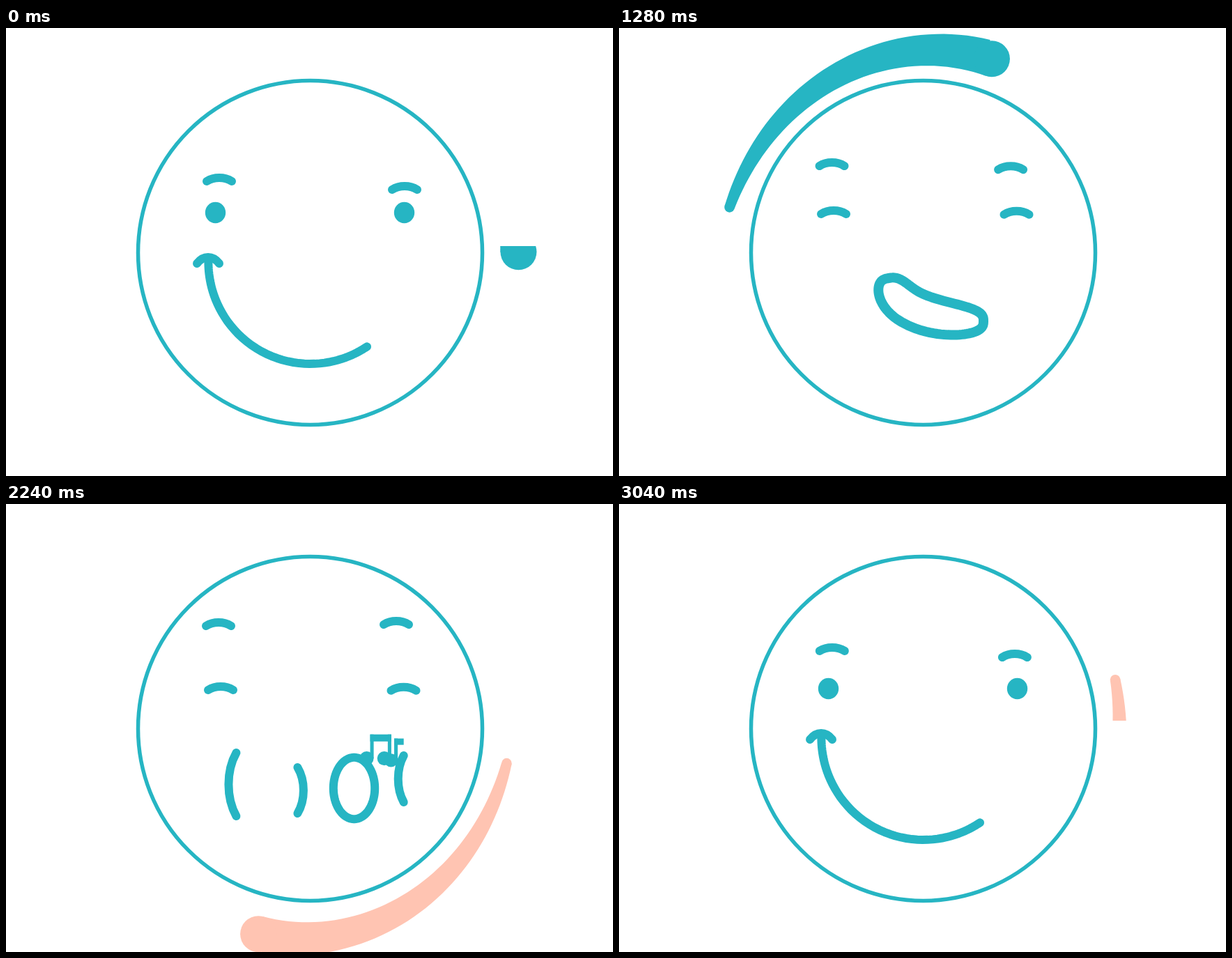
An HTML page with a canvas for the animation above (3.12 s loop, 871x643 px).

```html
<!DOCTYPE html>
<html lang="en">
<head>
<meta charset="utf-8">
<title>Whistling face</title>
<style>
html, body { margin: 0; width: 100%; height: 100%; overflow: hidden; background: #fff; }
canvas { display: block; }
</style>
</head>
<body>
<canvas id="stage" width="871" height="643"></canvas>
<script>
const c = document.getElementById('stage').getContext('2d');
const TEAL = '#26b5c3', PINK = '#ffc4b2';
const LOOP = 3120, STEP = 80, PINK_START = 1510;
const SING = 1120, STOP = 2720;
const RAD = Math.PI / 180, TAU = Math.PI * 2;

const mix = (a, b, k) => a + (b - a) * k;
const ramp = (t, start, length) => Math.min(1, Math.max(0, (t - start) / length));
const settle = (t, start, rate) => t < start ? 0 : 1 - Math.exp((start - t) / rate);
const power = (v, p) => Math.sign(v) * Math.abs(v) ** p;

function dot(x, y, rx, ry = rx) {
  c.beginPath();
  c.ellipse(x, y, rx, ry, 0, 0, TAU);
  c.fill();
}

// Shallow arc between two points, bulging to the left of its direction.
function bow(x0, y0, x1, y1, sag) {
  const dx = x1 - x0, dy = y1 - y0, lift = sag * 4 / 3 / Math.hypot(dx, dy);
  const handle = k => [x0 + dx * k + dy * lift, y0 + dy * k - dx * lift];
  c.beginPath();
  c.moveTo(x0, y0);
  c.bezierCurveTo(...handle(0.29), ...handle(0.71), x1, y1);
  c.stroke();
}

const lid = (x, y) => bow(x - 18, y + 5, x + 18, y + 5, 5);

// Tapered streak that speeds up clockwise around the face.
function comet(ms, color) {
  if (ms < 0) return;
  const t = ms / 1000;
  const head = 117.5 * t + 59 * t ** 3.5 - 1.1, tail = head - 95.2;
  if (tail > 360) return;
  const n = 48;
  const spot = k => ({
    a: mix(tail, head, k) * RAD,
    r: mix(286, 299.5, k) - 54 * k * (1 - k) ** 2,
    w: mix(7.3, 26, k)
  });
  const polar = (a, r) => [436 + r * Math.cos(a), 327 + r * Math.sin(a)];
  c.save();
  // It emerges and vanishes at a level line on the right.
  c.beginPath();
  if (head < 100) c.rect(0, 313, 871, 330);
  else c.rect(0, 0, 871, head > 355 ? 311 : 643);
  c.clip();
  c.fillStyle = color;
  c.beginPath();
  for (let i = -n; i <= n; i++) {
    const { a, r, w } = spot(1 - Math.abs(i) / n);
    c.lineTo(...polar(a, r + (i < 0 ? w : -w)));
  }
  c.fill();
  for (const { a, r, w } of [spot(0), spot(1)]) dot(...polar(a, r), w);
  c.restore();
}

// Mouths: a spine for u in -1..1, a half width and a corner roundness.
const SMILE = {
  spine: u => {
    const a = mix(181.5, 56.2, (u + 1) / 2) * RAD;
    return [436.7 + 146.3 * Math.cos(a), 335.7 + 146.3 * Math.sin(a)];
  },
  width: 0, round: 1
};
const BEAN = {
  spine: u => {
    const k = (u + 1) / 2;
    const quad = (a, b, d) => mix(mix(a, b, k), mix(b, d, k), k);
    return [quad(387, 397, 523), quad(359, 419, 421)];
  },
  width: 25, round: 0.7
};
const OVAL = { spine: u => [499.5, 408 + 44.2 * u], width: 29.7, round: 1 };

function rim({ spine, width, round }, a) {
  const u = power(Math.cos(a), round), w = width * power(Math.sin(a), round);
  const [x, y] = spine(u), [x0, y0] = spine(u - 0.01), [x1, y1] = spine(u + 0.01);
  const len = Math.hypot(x1 - x0, y1 - y0);
  return [x - w * (y1 - y0) / len, y + w * (x1 - x0) / len];
}

function mouth(m) {
  const [from, to, k] = m < 1 ? [SMILE, BEAN, m] : [BEAN, OVAL, m - 1];
  c.lineWidth = 14 - 2 * Math.abs(m - 1);
  c.beginPath();
  for (let i = 0; i < 120; i++) {
    const a = i / 120 * TAU, p = rim(from, a), q = rim(to, a);
    c.lineTo(mix(p[0], q[0], k), mix(p[1], q[1], k));
  }
  c.closePath();
  c.stroke();
  c.lineWidth = 12;
  if (m === 0) bow(274, 338, 306, 338, 9);
}

function cheeks(grow, drift) {
  if (grow <= 0) return;
  const side = (x, y, half, sag) => bow(x, y - half * grow, x, y + half * grow, sag * grow);
  side(328 + 3 * drift, 402.5, 45.5, -11);
  side(420 - 2 * drift, 411, 33, 8.5);
  side(569.5 + 1.5 * drift, 394.5, 33.5, -8);
}

// Notes grow as they drift up and out of the mouth.
function note(age, pair) {
  const s = 0.41 + 0.0028 * age, k = s - 1;
  if (age < 0 || s > 1.45) return;
  c.save();
  c.globalAlpha = Math.min(1, (1.45 - s) / 0.2);
  if (pair) c.translate(531 + 54 * k, 354 - 87 * k);
  else c.translate(556 + 127 * k, 358 - 99 * k);
  c.scale(s, s);
  if (pair) {
    dot(-14, 12, 10);
    dot(11, 12, 10);
    c.fillRect(-9, -22, 5, 34);
    c.fillRect(16, -22, 5, 34);
    c.fillRect(-9, -22, 30, 10);
  } else {
    dot(-5, 11, 9.5);
    c.fillRect(-0.5, -20, 5, 31);
    c.fillRect(-0.5, -20, 13.5, 9);
  }
  c.restore();
}

function draw(t) {
  c.clearRect(0, 0, 871, 643);
  comet(t, TEAL);
  comet(t - PINK_START, PINK);

  c.fillStyle = c.strokeStyle = TEAL;
  c.lineCap = c.lineJoin = 'round';
  c.lineWidth = 5.5;
  c.beginPath();
  c.arc(436.5, 322.5, 247, 0, TAU);
  c.stroke();

  c.lineWidth = 12;
  const lift = settle(t, SING + 60, 150) - settle(t, STOP + 80, 150);
  lid(306 - lift, 215 - 45 * lift);
  lid(572 - 12 * Math.min(1, 1.7 * lift), 227 - 59 * lift);
  if (t >= SING + 80 && t < STOP + 160) {
    lid(308, 262);
    lid(570.5, 262.7);
  } else {
    dot(300.5, 265, 14.7, 15.2);
    dot(571.5, 265, 14.7, 15.2);
  }

  mouth(2 * (ramp(t, SING, 320) - ramp(t, STOP, 240)));
  cheeks(ramp(t, SING + 240, 160) - ramp(t, STOP, 120), settle(t, 1600, 390));
  for (let i = 0; i < 3; i++) {
    const age = t - 1560 - 465 * i;
    if (i < 2) note(age, true);
    if (i > 0) note(age, false);
  }
}

const began = performance.now();
function tick() {
  const t = (performance.now() - began) % LOOP;
  draw(Math.floor(t / STEP) * STEP);
  requestAnimationFrame(tick);
}
tick();
</script>
</body>
</html>
```
